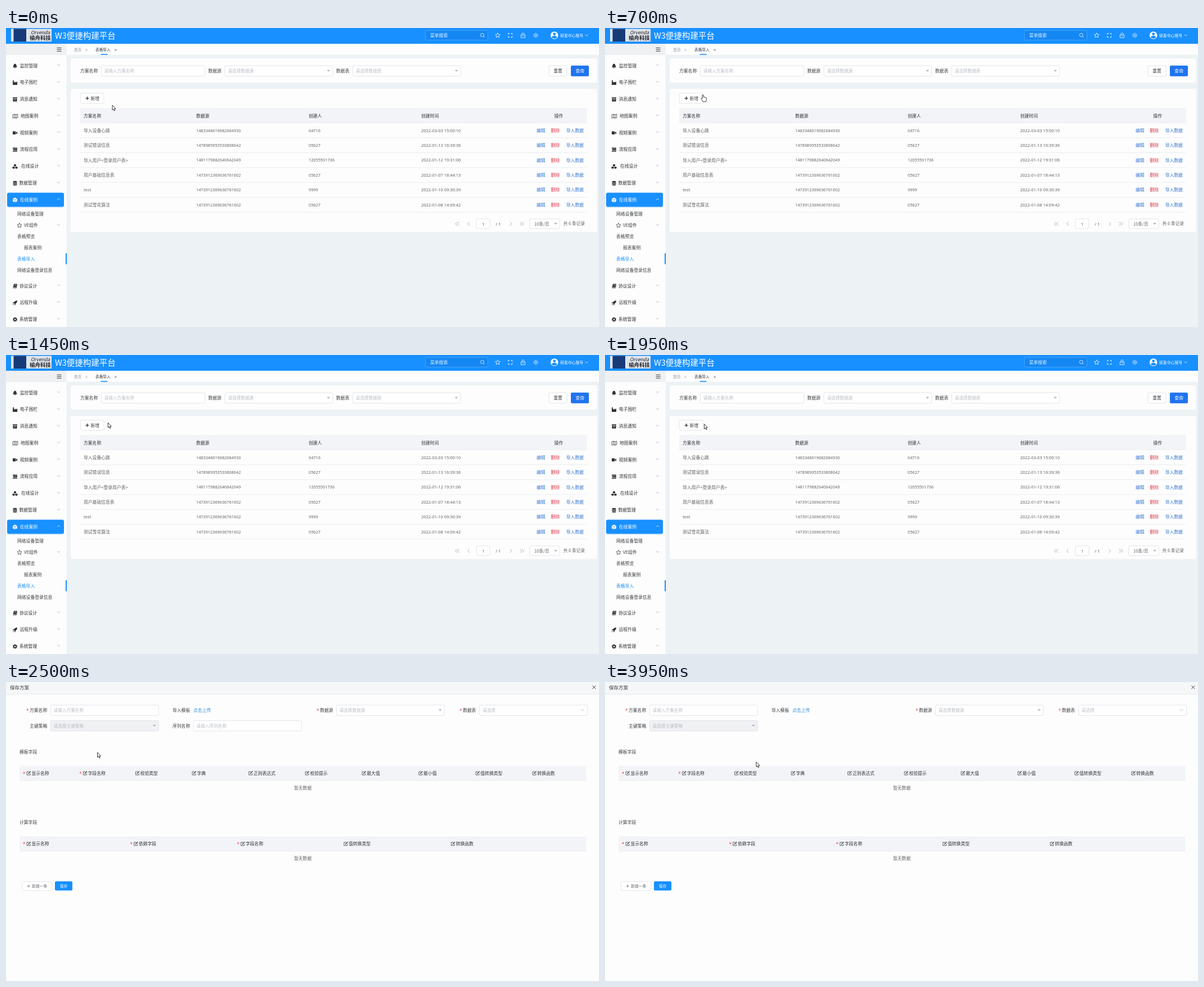
Recreate the animation shown at these times as an HTML page. Size 1054 by 531 pixels, loop 4.95 s.

```html
<!DOCTYPE html>
<html lang="zh-CN">
<head>
<meta charset="utf-8">
<title>表格导入</title>
<style>
html, body { margin: 0; width: 100%; height: 100%; overflow: hidden; background: #fdfdfd; }
svg { display: block; width: 1054px; height: 531px; }
text { font-family: "Noto Sans CJK SC", "Noto Sans CJK", "Noto Sans", sans-serif; white-space: pre; }
.num { font-family: "Noto Sans", "Open Sans", sans-serif; }
</style>
</head>
<body>
<svg id="stage" viewBox="0 0 1054 531" width="1054" height="531"></svg>
<script>
const BLUE = '#1890ff', INK = '#3c3e42', CELL = '#606266', HINT = '#b9bdc5',
  LINE = '#dcdfe6', PAPER = '#fdfdfd', HEAD = '#f3f4f7', LINK = '#3576d2', RED = '#e0374c';

// y is the visual centre of the line
const text = (x, y, s, color = INK, size = 7.8, extra = '') =>
  `<text x="${x}" y="${(y + size * 0.37).toFixed(2)}" font-size="${size}" fill="${color}" ${extra}>${s}</text>`;
const num = (x, y, s, size = 7.3, color = CELL) => text(x, y, s, color, size, 'class="num"');
const rect = (x, y, w, h, fill, r = 0, stroke = 'none') =>
  `<rect x="${x}" y="${y}" width="${w}" height="${h}" rx="${r}" fill="${fill}" stroke="${stroke}" stroke-width=".8"/>`;
const line = (d, color, w = 0.8) =>
  `<path d="${d}" fill="none" stroke="${color}" stroke-width="${w}"/>`;
const fill = (d, color) => `<path d="${d}" fill="${color}" fill-rule="evenodd"/>`;
const at = (x, y, body) => `<g transform="translate(${x} ${y})">${body}</g>`;
const chevron = (x, y, color = '#a3a6ad', dir = 1) =>
  line(`M${x - 2.5} ${y - 1.2 * dir}L${x} ${y + 1.2 * dir}L${x + 2.5} ${y - 1.2 * dir}`, color);
const caret = (x, y) => fill(`M${x - 3} ${y - 1.6}h6l-3 3.4Z`, '#b4b8c0');
const cross = (x, y, r, color, w) =>
  line(`M${x - r} ${y - r}l${2 * r} ${2 * r}M${x + r} ${y - r}l${-2 * r} ${2 * r}`, color, w);
const plus = (x, y, r, color, w) => line(`M${x - r} ${y}h${2 * r}M${x} ${y - r}v${2 * r}`, color, w);
const star = (x, y, r, color) => {
  let d = '';
  for (let i = 0; i < 10; i++) {
    const a = i * Math.PI / 5, q = i % 2 ? r * 0.48 : r;
    d += `${i ? 'L' : 'M'}${(x + q * Math.sin(a)).toFixed(2)} ${(y - q * Math.cos(a)).toFixed(2)}`;
  }
  return line(d + 'Z', color);
};
const gear = (x, y, color) =>
  `<circle cx="${x}" cy="${y}" r="2.2" fill="none" stroke="${color}" stroke-width="1.8"/>` +
  `<circle cx="${x}" cy="${y}" r="3.4" fill="none" stroke="${color}" stroke-width="1.2" stroke-dasharray="1.4 1.27"/>`;
const field = (x, y, w, hint, opts = {}) =>
  rect(x, y, w, 18.5, opts.fill || '#fff', 2, LINE) +
  text(x + 5.2, y + 9.3, hint, HINT, 7.65) +
  (opts.caret ? caret(x + w - 7.5, y + 9) : '');

const ICONS = {
  bell: 'M-4 2.5C-2.4 1.5-3-3.8 0-3.8S2.4 1.5 4 2.5ZM-1.1 3h2.2v1h-2.2Z',
  plant: 'M-4 4V-4h1.9V0L.8-2V0L4-2V4Z',
  box: 'M-4-3.6h8v2h-8ZM-3.6-1h7.2v4.6h-7.2ZM-1.3 0v.8h2.6V0Z',
  video: 'M-4-2.7h5.3v5.4h-5.3ZM1.8-.8L4-2.4V2.4L1.8.8Z',
  flow: 'M-4-3.5h8v1.9h-8ZM-3-1h7V.9h-7ZM-4 1.6h8v1.9h-8Z',
  cubes: 'M0-4.2L2.1-3.2V-.8L0 .2L-2.1-.8V-3.2ZM-2.5 0L-.3 1V3.2L-2.5 4.2L-4.7 3.2V1ZM2.5 0L4.7 1V3.2L2.5 4.2L.3 3.2V1Z',
  data: 'M-3.5-2.8C-3.5-4.4 3.5-4.4 3.5-2.8V-1.5C2-.7-2-.7-3.5-1.5ZM-3.5-.6C-2 .2 2 .2 3.5-.6V1.2C2 2-2 2-3.5 1.2ZM-3.5 2C-2 2.8 2 2.8 3.5 2V3C3.5 4.4-3.5 4.4-3.5 3Z',
  cube: 'M0-4.2L3.8-2.6L0-1L-3.8-2.6ZM-4-1.9L-.4-.4V4.1L-4 2.4ZM4-1.9L.4-.4V4.1L4 2.4Z',
  book: 'M-2-3.8H4L2.4 2H-3.4ZM-3.9 2.6H2.6L4.2-2.6V-1L2.8 3.8H-3.4ZM-.8-2.4L-1.1-1.5H2L2.3-2.4Z',
  rocket: 'M4-4C1-4-.6-2.6-1.6-1L-3.7-.6L-4.2 1L-2 .8L-.8 2L-1 4.2L.6 3.7L1 1.6C2.6.6 4-1 4-4ZM-3.4 2L-4 4L-2 3.4Z'
};
const icon = (name, y, color) =>
  name === 'gear' ? gear(16, y, color)
  : name === 'map' ? at(16.5, y, line('M-4.3-2.6L-1.4-3.6L1.4-2.6L4.3-3.6V2.6L1.4 3.6L-1.4 2.6L-4.3 3.6ZM-1.4-3.6V2.6M1.4-2.6V3.6', color))
  : at(16, y, fill(ICONS[name], color));

function topBar() {
  const white = '#fff';
  return rect(0, 0, 1054, 28, BLUE) +
    rect(9, 1.5, 72, 22.5, '#dfe3e9') + rect(13.5, 1.5, 22.5, 22.5, '#173a78') +
    text(61, 7.5, 'Orvenda', '#1d2027', 8.5, 'text-anchor="middle" font-style="italic"') +
    text(61, 18, '榆舟科技', '#1d2027', 9.4, 'text-anchor="middle" font-weight="bold"') +
    text(87, 13.5, 'W3便捷构建平台', white, 14.5) +
    rect(745.4, 4.4, 111, 17, '#1587f3', 2, '#52acff') + text(754, 13, '菜单搜索', '#e8f4ff') +
    `<circle cx="846.5" cy="12.5" r="3" fill="none" stroke="#fff" stroke-width=".8"/>` + line('M848.7 14.7l2 2', white) +
    star(874, 13.2, 4.5, white) +
    line('M892.8 11.5V9.7h2.2M897.5 9.7h2.2v1.8M899.7 14.5v2h-2.2M895 16.5h-2.2v-2', white, 1) +
    line('M915.3 12.3h7.4v4.9h-7.4ZM917 12.3V10.5Q917 8.8 919 8.8T921 10.5V12.3M919 14v1.5', white) +
    `<circle cx="941.5" cy="13" r="3.5" fill="none" stroke="#fff" stroke-width="1" stroke-dasharray="2.6 1.06"/>` +
    `<circle cx="941.5" cy="13" r="1.5" fill="none" stroke="#fff" stroke-width=".8"/>` +
    `<circle cx="974.7" cy="13" r="6.8" fill="#fff"/><circle cx="974.7" cy="10.7" r="2.4" fill="${BLUE}"/>` +
    fill('M970 17Q970.5 13.8 974.7 13.8T979.4 17Q977.5 18.8 974.7 18.8T970 17Z', BLUE) +
    text(985, 13, '研发中心账号', white, 6.85) + chevron(1032, 13, white);
}

function sidebar() {
  const menu = [
    ['bell', '监控管理', 66.8, 24.8], ['plant', '电子围栏', 96.6, 24.8], ['box', '消息通知', 126.4, 24.5],
    ['map', '地图案例', 156.1, 26], ['video', '视频案例', 185.8, 24.8], ['flow', '流程应用', 215.6, 24.8],
    ['cubes', '在线设计', 245.4, 27], ['data', '数据管理', 275.2, 23.5], ['cube', '在线案例', 305, 24.8],
    ['book', '协议设计', 457.8, 24], ['rocket', '远程升级', 487.5, 24.5], ['gear', '系统管理', 517.2, 24]
  ];
  const subs = [['网络设备管理', 20], ['VE组件', 32], ['表格预览', 20], ['报表案例', 32], ['表格导入', 20], ['网络设备登录信息', 20]];
  let s = rect(0, 28, 107.5, 503, PAPER) + rect(0, 28, 107.5, 20, '#eff0f2') +
    line('M90.5 35.3h8M90.5 38.3h8M90.5 41.3h8', '#3a3a3a', 1.1) +
    `<rect x="2" y="294" width="101" height="25" rx="3" fill="${BLUE}" opacity=".22"/>` +
    rect(2, 292.5, 101, 25, BLUE, 3);
  for (const [name, label, y, x] of menu) {
    const on = name === 'cube', color = on ? '#fff' : '#303133';
    s += icon(name, y + 0.5, color) + text(x, y, label, color) + chevron(93.5, y - 1, on ? '#fff' : undefined, on ? -1 : 1);
  }
  subs.forEach(([label, x], i) => {
    s += text(x, 330.4 + i * 19.9, label, i === 4 ? BLUE : INK);
  });
  return s + star(24, 350.7, 4.3, INK) + chevron(93.5, 349.5) + rect(106, 400, 2, 19.5, BLUE);
}

function tableCard() {
  const rows = [
    ['导入设备心跳', '1483348619682684930', '04716', '2022-03-03 15:00:10'],
    ['测试错误信息', '1478989953533808642', '05627', '2022-01-13 16:39:36'],
    ['导入用户&lt;登录用户表&gt;', '1481179882640642049', '12055501736', '2022-01-12 19:31:06'],
    ['用户基础信息表', '1473912369636761602', '05627', '2022-01-07 18:44:13'],
    ['test', '1473912369636761602', '9999', '2022-01-10 09:30:39'],
    ['测试雪花算法', '1473912369636761602', '05627', '2022-01-08 14:09:42']
  ];
  let s = rect(115, 108, 935.5, 254.5, PAPER, 4) +
    `<rect id="addBtn" x="132.4" y="115.6" width="41.6" height="18.2" rx="2" fill="#fff" stroke-width=".8"/>` +
    plus(144.5, 124.8, 3, '#303133', 1.3) + text(150.5, 124.8, '新增') +
    rect(132, 142, 900.5, 26, HEAD);
  [[138, '方案名称'], [338, '数据源'], [538, '创建人'], [738, '创建时间'], [974.5, '操作']].forEach(([x, label]) => {
    s += text(x, 156, label, '#303133', 7.8, 'font-weight="500"');
  });
  s += line('M132 168.2h900.5', '#e6e9f0');
  rows.forEach(([name, id, user, date], i) => {
    const y = 181.8 + i * 26.45;
    s += (name === 'test' ? num(138, y, name, 7.6) : text(138, y, name, CELL)) +
      num(338, y, id) + num(538, y, user) + num(738, y, date, 7.45) +
      text(943, y, '编辑', LINK) + text(968.5, y, '删除', RED) + text(995.7, y, '导入数据', LINK) +
      line(`M132 ${y + 13.1}h900.5`, '#e6e9f0');
  });
  const angle = (x, dir) => line(`M${x + 1.7 * dir} 344.5L${x - 1.7 * dir} 347.8L${x + 1.7 * dir} 351`, '#9a9da3');
  return s + angle(800.2, 1) + angle(803.8, 1) + angle(822.3, 1) + angle(897.3, -1) + angle(915.2, -1) + angle(918.8, -1) +
    rect(836.3, 339, 23.8, 17, '#fff', 2, LINE) + num(846, 347.8, '1', 7.5) + num(870.5, 347.8, '/ 1', 7.5) +
    rect(930.7, 339, 53.5, 17, '#fff', 2, LINE) + text(939, 347.8, '10条/页', CELL, 7.6) + caret(977, 347.6) +
    text(990.5, 347.6, '共 6 条记录', CELL, 7.7);
}

function listPage() {
  return rect(0, 0, 1054, 531, '#edf2f5') + topBar() +
    rect(107.5, 28, 946.5, 19.5, PAPER) +
    text(121, 38.5, '首页', '#909399', 6.7) + cross(143, 39, 1.7, '#a3a6ad', 0.7) +
    text(159, 38.5, '表格导入', INK, 6.7) + cross(195, 39, 1.7, '#55585e', 0.7) +
    rect(168.5, 46, 12, 1.6, BLUE) + sidebar() +
    rect(115, 54, 935.5, 43, PAPER, 4) +
    text(132, 76.2, '方案名称') + field(169.4, 67, 184, '请输入方案名称') +
    text(359.5, 76.2, '数据源') + field(389.2, 67, 191.5, '请选择数据源', { caret: true }) +
    text(586.8, 76.2, '数据表') + field(616.4, 67, 191.6, '请选择数据表', { caret: true }) +
    rect(965.3, 67, 31.7, 18.5, '#fff', 2, LINE) + text(973.3, 76.2, '重置') +
    rect(1004, 66.8, 32, 19, '#1f74ee', 2) + text(1012.3, 76.2, '查询', '#fff') +
    tableCard();
}

const required = (x, y) => num(x - 2, y + 1, '*', 8, '#f0434f');
const editIcon = (x, y) =>
  line(`M${x + 4.5} ${y - 2.6}H${x + 0.4}v6h6V${y + 0.4}`, '#44474d') +
  line(`M${x + 2.6} ${y + 1.3}l4.4-4.5`, '#44474d', 1.4);

function editTable(top, title, cols, stars) {
  const y = top + 13.2;
  let s = text(24, top - 25, title) + rect(24, top, 1007.5, 26, HEAD) + line(`M24 ${top + 26}h1007.5`, '#e6e9f0');
  cols.forEach(([x, label], i) => {
    if (i < stars) s += required(x - 4.7, y);
    s += editIcon(x, y - 0.3) + text(x + 8.7, y, label, '#303133', 7.8, 'font-weight="500"');
  });
  return s + text(512, top + 39.4, '暂无数据', CELL);
}

function dialog() {
  return rect(0, 0, 1054, 531, PAPER) + rect(0, 0, 1054, 21.5, '#f6f7f8') + line('M0 21.6h1054', '#e4e6ea') +
    text(7, 10, '保存方案', '#303133', 8.5) + cross(1045.3, 9.3, 3, '#3a3a3a', 1) +
    required(38, 50.3) + text(42, 50.3, '方案名称') + field(79.4, 41, 191.8, '请输入方案名称') +
    text(296, 50.3, '导入模板') + text(333, 50.3, '点击上传', '#2f8ee0') +
    required(554, 50.3) + text(558, 50.3, '数据源') + field(587.4, 41, 191.8, '请选择数据源', { caret: true }) +
    required(808, 50.3) + text(812, 50.3, '数据表') + field(841.8, 41, 191.8, '请选择') + chevron(1024.5, 50) +
    text(42, 78, '主键策略') + field(79.4, 68.5, 191.8, '请选择主键策略', { caret: true, fill: '#f0f1f3' }) +
    `<g id="serial">${text(296, 78, '序列名称') + field(333.4, 68.5, 191.8, '请输入序列名称')}</g>` +
    editTable(148.8, '模板字段', [[36.7, '显示名称'], [137, '字段名称'], [230, '校验类型'], [330.7, '字典'], [431.2, '正则表达式'],
      [531.7, '校验提示'], [632.6, '最大值'], [733.4, '最小值'], [834.6, '值转换类型'], [935.6, '转换函数']], 2) +
    editTable(274.2, '计算字段', [[36.7, '显示名称'], [227.2, '依赖字段'], [417.3, '字段名称'], [600.3, '值转换类型'], [791, '转换函数']], 3) +
    rect(28.4, 354.4, 53.2, 15.8, '#fff', 2, LINE) + plus(40.2, 362.5, 2.6, '#606266', 0.7) + text(46, 362.4, '新增一条', CELL, 6.8) +
    rect(87, 354, 31, 16.2, BLUE, 2) + text(95.7, 362.4, '保存', '#fff', 6.8);
}

const pointer = d => `<path d="${d}" fill="#fff" stroke="#222" stroke-width=".9" stroke-linejoin="round"/>`;
const stage = document.getElementById('stage');
stage.innerHTML = `<g id="list">${listPage()}</g><g id="dialog">${dialog()}</g><g id="cursor">` +
  `<g id="arrow">${pointer('M.3.3V9L2.2 7.2L3.6 10.3L5 9.7L3.7 6.7H6.3Z')}</g>` +
  `<g id="hand">${pointer('M-1.1 7V.9Q0-.6 1.1.9V4.3Q2.2 3.6 3 4.7Q4.2 4 4.8 5.2Q6 4.8 6.3 6.2V9Q6.3 11 5.2 12.5H.2Q-1.2 10.5-2.8 8.2Q-3.4 6.6-2.4 6.3Q-1.6 6.4-1.1 7Z')}</g></g>`;
const get = id => document.getElementById(id);
const list = get('list'), form = get('dialog'), serial = get('serial'), addBtn = get('addBtn'),
  cursor = get('cursor'), arrow = get('arrow'), hand = get('hand');

const LOOP = 4950, STEP = 50, PRESS = 2350, OPEN = 2500, SERIAL_OFF = 2650;
// time, x, y of the pointer tip
const PATH = [
  [0, 188.7, 136.7], [550, 178, 122], [700, 174, 118.4], [1100, 169, 120], [1200, 169, 120],
  [1450, 181, 120], [1700, 183, 121], [1800, 183, 121], [2250, 162.2, 124.7], [3200, 162.2, 124.7],
  [3250, 168.3, 125.2], [3550, 293, 147], [3750, 293, 147], [3950, 268.6, 141.7], [LOOP, 268.6, 141.7]
];

function pointerAt(t) {
  const i = PATH.findIndex((p, k) => k > 0 && t <= p[0]);
  const [t0, x0, y0] = PATH[i - 1], [t1, x1, y1] = PATH[i];
  const k = (t - t0) / (t1 - t0);
  return [x0 + (x1 - x0) * k, y0 + (y1 - y0) * k];
}

const show = (el, on) => el.setAttribute('visibility', on ? 'visible' : 'hidden');

function draw(ms) {
  const t = Math.floor((ms % LOOP) / STEP) * STEP;
  const [x, y] = pointerAt(t);
  const open = t >= OPEN;
  const onButton = !open && x < 175 && y < 134;
  const useHand = onButton && t < PRESS;
  show(list, !open);
  show(form, open);
  show(serial, open && t < SERIAL_OFF);
  show(arrow, !useHand);
  show(hand, useHand);
  addBtn.setAttribute('stroke', onButton && x < 173 ? '#2f78dc' : LINE);
  cursor.setAttribute('transform', `translate(${x.toFixed(2)} ${y.toFixed(2)})`);
}

const start = performance.now();
function tick() {
  draw(performance.now() - start);
  requestAnimationFrame(tick);
}
tick();
</script>
</body>
</html>
```
